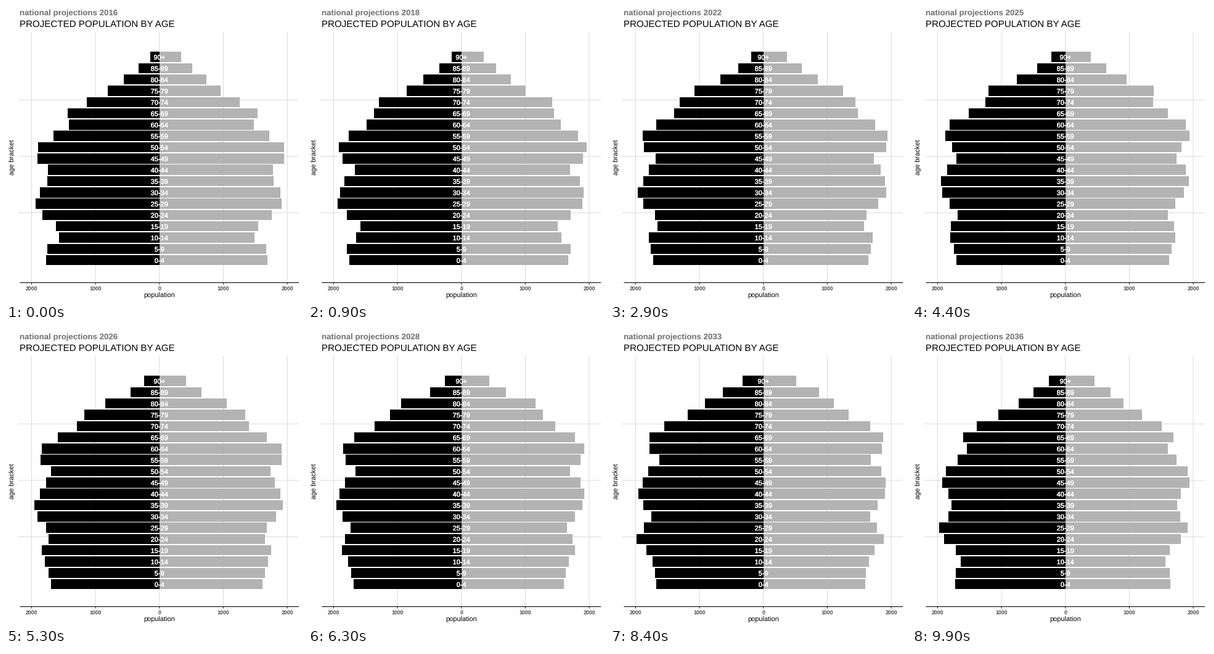
Recreate the animation shown at these times as a matplotlib script. Size 480 px wide and 480 px high, loop 10 s.

```python
import matplotlib.patheffects as pe
import matplotlib.pyplot as plt
import numpy as np
from matplotlib.animation import FuncAnimation
from matplotlib.patches import Rectangle

SIZE, DPI = 480, 80
PX = 72 / DPI  # points per pixel
ZERO_X = 249  # where the two halves meet
AXIS_X, THOUSAND = 248.75, 103.65  # axis centre and pixels per 1000
FIRST_YEAR, YEARS = 2016, 21
GRID, TICK = "#dcdcdc", "#333333"

plt.rcParams["font.family"] = "Liberation Sans"
plt.rcParams["text.hinting"] = "none"

AGES = np.arange(87.5, 0, -5)  # bracket midpoints, oldest first
BRACKETS = ["90+"] + [f"{age}-{age + 4}" for age in range(85, -1, -5)]

# Size of a male birth cohort in its prime, as bar length: (birth year, pixels)
COHORTS = [
    (1928.5, 81), (1933.5, 95), (1938.5, 111), (1942.5, 129), (1944.5, 148),
    (1947.5, 165), (1951, 153), (1954.5, 158), (1958.5, 177), (1962.5, 197),
    (1967, 201), (1970, 196), (1973, 184), (1975.5, 174), (1979.5, 187),
    (1983.5, 194), (1989.5, 204), (1993, 200), (1997.5, 190), (2001.5, 182),
    (2005.5, 196), (2010, 215), (2014, 213), (2019.5, 208), (2026, 203), (2034, 202),
]

# Frames that show a half-way step to the next year
STEPS = [*range(3, 84, 5), *range(87, 100, 4)]


def natural_spline(points):
    """Natural cubic spline through (x, y) points."""
    xs, ys = np.array(points, float).T
    origin = xs[0]
    xs = xs - origin
    n = len(xs)
    linear = np.column_stack([np.ones(n), xs])
    kernel = np.abs(xs[:, None] - xs) ** 3
    system = np.block([[kernel, linear], [linear.T, np.zeros((2, 2))]])
    coef = np.linalg.solve(system, np.append(ys, [0, 0]))

    def at(x):
        x = np.asarray(x) - origin
        return np.abs(x[:, None] - xs) ** 3 @ coef[:n] + coef[n] + coef[n + 1] * x

    return at


def logistic(x):
    return 1 / (1 + np.exp(-x))


cohort_size = natural_spline(COHORTS)


def population(year):
    """Bar lengths of men and women, oldest bracket first."""
    born, dt = year - AGES, year - FIRST_YEAR
    migration = 0.862 + 0.14 * logistic((AGES - 20.5) / 3)
    survival = np.exp(-0.865 * np.exp(0.113 * (AGES - 87.5)))
    men = cohort_size(born) * migration * survival

    sex_ratio = 0.948 + 0.067 * logistic((1989 - born) / 2.2)
    longer_life = np.exp(0.43 * np.exp(0.11 * (AGES - 87.5)) * (1 - 0.018 * dt))
    women = men * sex_ratio * longer_life

    oldest_men = 15 + 0.6 * dt + 0.03 * dt**2
    oldest_women = 35 + 0.2 * dt + 0.05 * dt**2
    return np.array([np.append(oldest_men, men), np.append(oldest_women, women)])


def pose(frame):
    """Title year and bar lengths for a frame."""
    halfway = frame in STEPS
    index = sum(step <= frame for step in STEPS) - halfway
    lengths = population(FIRST_YEAR + index)
    if halfway:
        lengths = (lengths + population(FIRST_YEAR + (index + 1) % YEARS)) / 2
    return FIRST_YEAR + index, np.round(lengths)


fig = plt.figure(figsize=(SIZE / DPI, SIZE / DPI), dpi=DPI, facecolor="white")
ax = fig.add_axes([0, 0, 1, 1])
ax.set_xlim(0, SIZE)
ax.set_ylim(SIZE, 0)
ax.axis("off")


def line(x0, y0, x1, y1, color, z=1):
    ax.plot([x0, x1], [y0, y1], color=color, lw=1.07 * PX,
            solid_capstyle="butt", snap=False, zorder=z)


def text(x, y, s, size, color="black", **kw):
    return ax.text(x, y, s, fontsize=size * PX, color=color, zorder=5, **kw)


def bar(top, bottom, color):
    patch = Rectangle((ZERO_X, top), 0, bottom - top, fc=color, lw=0, aa=False, zorder=3)
    return ax.add_patch(patch)


for i in range(3):
    y = 152.25 + 91.55 * i
    line(20, y, 475, y, GRID)
for k in range(-2, 3):
    x = AXIS_X + THOUSAND * k
    line(x, 42, x, 448, GRID)
    line(x, 449, x, 451.7, TICK)
    text(x, 461, str(abs(k) * 1000), 8.8, "#4d4d4d", weight="bold", ha="center")
line(22.5, 448.6, 475, 448.6, "black", 4)

title = text(22.5, 15, "", 13.2, "#6f6f6f", weight="bold")
text(22.5, 34, "PROJECTED POPULATION BY AGE", 15.17)
text(AXIS_X, 472.5, "population", 11, ha="center")
text(10.5, 245.7, "age bracket", 11, rotation=90, ha="center", va="center")

left_bars, right_bars = [], []
bolder = [pe.withStroke(linewidth=0.3, foreground="white")]
for row, name in enumerate(BRACKETS):
    top = 74.3 + 18.31 * row
    bottom = top + 16.5
    left_bars.append(bar(round(top), round(bottom), "black"))
    right_bars.append(bar(round(top), round(bottom), "#b3b3b3"))
    text(AXIS_X, (top + bottom) / 2 + 4.4, name, 11, "white", ha="center",
         path_effects=bolder)


def update(frame):
    year, (men, women) = pose(frame)
    title.set_text(f"national projections {year}")
    for patch, length in zip(left_bars, men):
        patch.set_x(ZERO_X - length)
        patch.set_width(length)
    for patch, length in zip(right_bars, women):
        patch.set_width(length)
    return [title, *left_bars, *right_bars]


anim = FuncAnimation(fig, update, frames=100, interval=100, repeat=True, repeat_delay=0)
plt.show()
```
